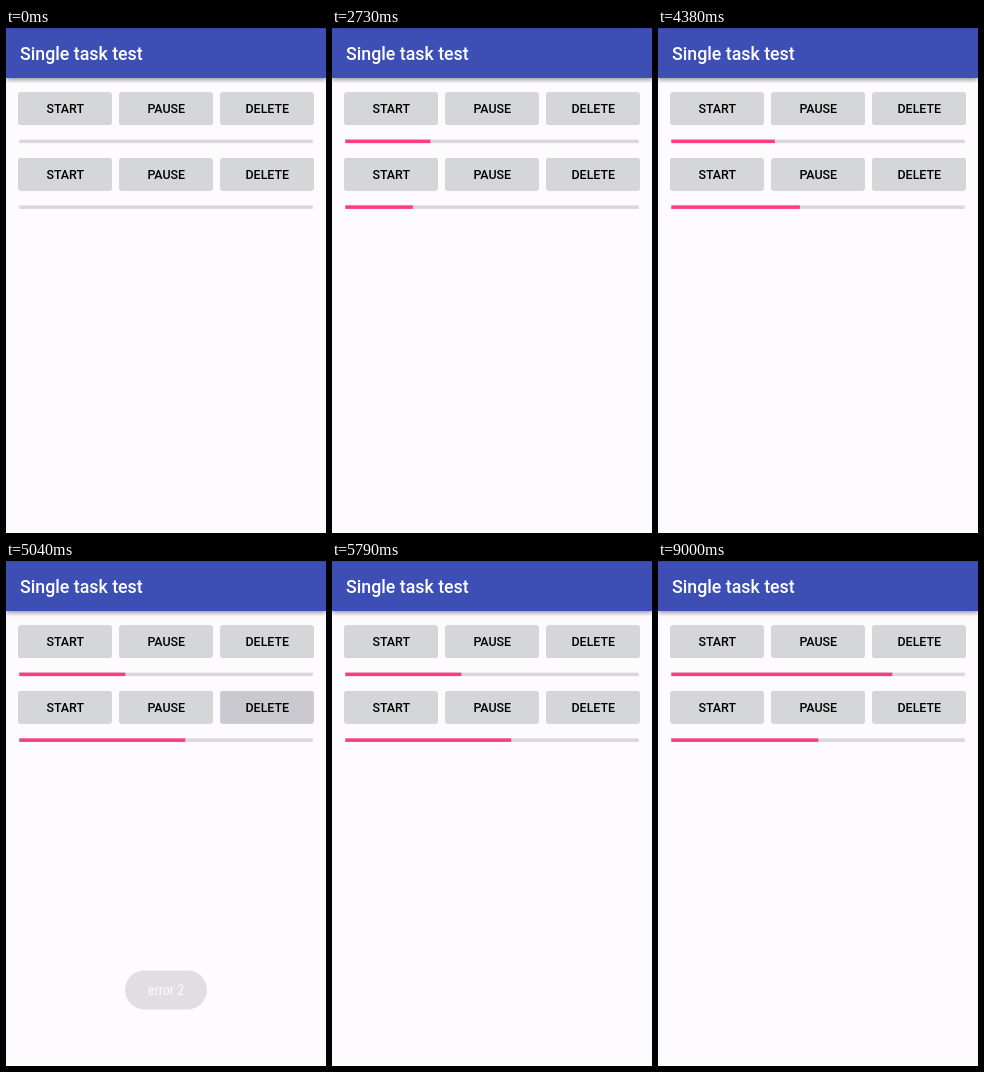
An HTML page for the animation above (9030 ms loop, 320 by 505 pixels).

```html
<!DOCTYPE html>
<html lang="en">
<head>
<meta charset="utf-8">
<title>Single task test</title>
<style>
  html, body { margin: 0; width: 100%; height: 100%; overflow: hidden; background: #fdfbfe; }
  svg { display: block; width: 320px; height: 505px; font-family: Roboto, sans-serif; }
  .bar { filter: drop-shadow(0 2px 2px rgba(0, 0, 0, .4)); }
  .button rect { fill: #d5d6d7; filter: drop-shadow(0 .5px .5px rgba(0, 0, 0, .25)); }
  .button .press { fill: #c9c9cf; filter: none; opacity: 0; }
  .button text { font-size: 12.44px; font-weight: 500; text-anchor: middle; }
  .toast { opacity: 0; }
  .toast rect { fill: #757575; }
  .toast text {
    font: 14px "Roboto Condensed", Roboto, sans-serif;
    font-stretch: condensed;
    fill: #f4f4f4;
    text-anchor: middle;
  }
</style>
</head>
<body>
<svg id="stage" viewBox="0 0 320 505">
  <rect y="503" width="320" height="2" fill="#fff"/>
  <g class="bar">
    <rect width="320" height="50" fill="#3d4fb5"/>
    <rect width="320" height="1" fill="#3646a2"/>
  </g>
  <text x="14" y="32" font-size="17.78" font-weight="500" fill="#fff">Single task test</text>
</svg>
<script>
const LOOP = 9030;
const LABELS = ['START', 'PAUSE', 'DELETE'];
const stage = document.getElementById('stage');

const clamp = v => Math.min(1, Math.max(0, v));

// Download that speeds up from time a to time b and adds the given length.
const grow = (t, a, b, length, power = 1.4) => length * clamp((t - a) / (b - a)) ** power;

// Fades in at a and out at b.
const fade = (t, a, b, time) => clamp((t - a) / time) * clamp(1 - (t - b) / time);

function add(parent, tag, attrs, text = '') {
  const el = document.createElementNS('http://www.w3.org/2000/svg', tag);
  for (const key in attrs) el.setAttribute(key, attrs[key]);
  el.textContent = text;
  return parent.appendChild(el);
}

// taps lists the press times of each button; progress gives the line's length.
function makeRow(y, taps, progress) {
  const presses = LABELS.map((label, i) => {
    const x = 12.4 + 101 * i;
    const box = { x, y, width: 93.2, height: 32.4, rx: 1.8 };
    const g = add(stage, 'g', { class: 'button' });
    add(g, 'rect', box);
    const press = add(g, 'rect', { ...box, class: 'press' });
    add(g, 'text', { x: x + 46.9, y: y + 21 }, label);
    return press;
  });
  const line = { x: 13.3, y: y + 47.2, height: 3.5 };
  add(stage, 'rect', { ...line, width: 293.5, fill: '#d8d7da' });
  const fill = add(stage, 'rect', { ...line, fill: '#fb3d7f' });

  return t => {
    fill.setAttribute('width', progress(t));
    presses.forEach((press, i) => {
      press.style.opacity = Math.max(0, ...taps[i].map(a => fade(t, a, a + 220, 100)));
    });
  };
}

function makeToast(label, width, from, to) {
  const el = add(stage, 'g', { class: 'toast' });
  add(el, 'rect', { x: 160 - width / 2, y: 409.4, width, height: 39, rx: 19.5 });
  add(el, 'text', { x: 160, y: 434.4 }, label);
  return t => { el.style.opacity = fade(t, from, to, 150); };
}

const parts = [
  makeRow(64.4, [[190], [], []], t =>
    grow(t, 300, 2970, 97) + grow(t, 3240, 4800, 9, 1) +
    grow(t, 5280, 6330, 27.5) + grow(t, 6915, 9000, 87.5)),

  // The second task is deleted and then downloaded again.
  makeRow(130.2, [[560, 3960, 5990], [2950], [4830]], t => t < 6030
    ? grow(t, 750, 3150, 99, 2) + grow(t, 4050, 4800, 67, 1)
    : grow(t, 6602, 9000, 147)),

  makeToast('paused 2', 96, 3080, 3850),
  makeToast('error 2', 82, 5010, 5590)
];

function draw() {
  const t = (performance.now() - start) % LOOP;
  for (const update of parts) update(t);
  requestAnimationFrame(draw);
}

const start = performance.now();
draw();
</script>
</body>
</html>
```
